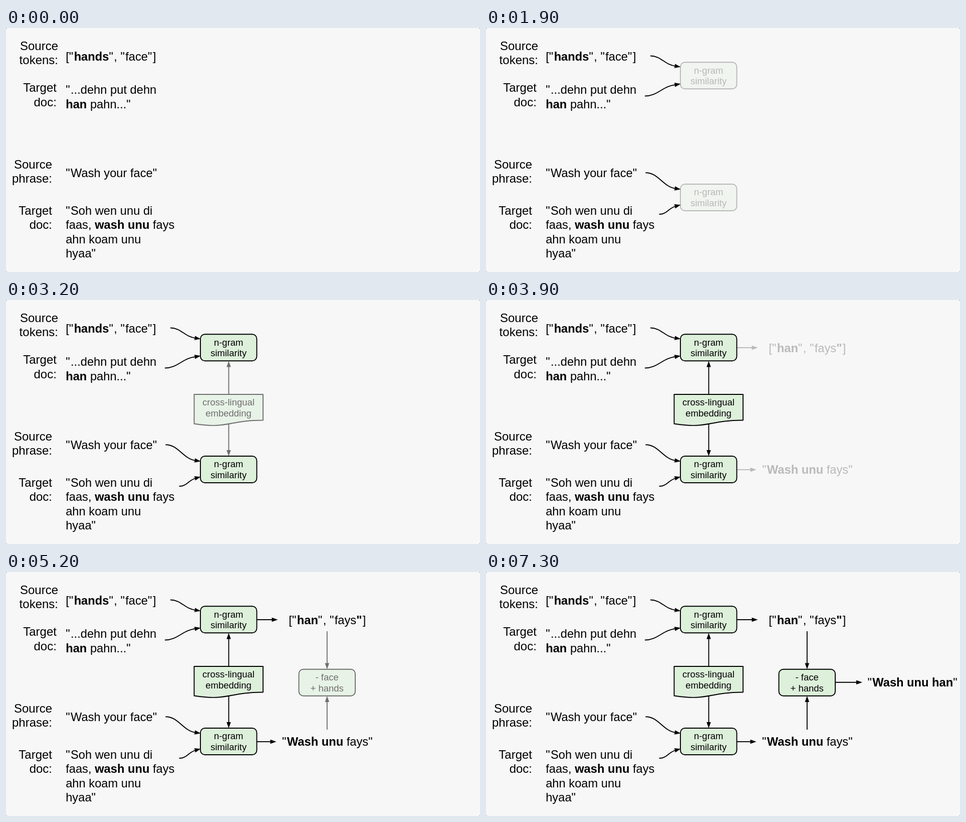
Animation, 946 px wide and 486 px high, one loop 7400 ms. Source, as an HTML page:

```html
<!DOCTYPE html>
<html lang="en">
<head>
<meta charset="utf-8">
<title>Phrase matching diagram</title>
<style>
  html, body { margin: 0; width: 100%; height: 100%; overflow: hidden; background: #666; }
  svg { display: block; width: 946px; height: 486px; }
  text { font-family: "Liberation Sans", Arial, sans-serif; font-size: 23.7px; fill: #000; white-space: pre; }
  .small { font-size: 18.5px; text-anchor: middle; }
  .right { font-size: 24px; text-anchor: end; }
  .bold { font-weight: bold; }
  .quote { letter-spacing: .06em; }
  .line { fill: none; stroke: #000; stroke-width: 1.9; }
  .shape { fill: #ddf0da; stroke: #000; stroke-width: 1.9; stroke-linejoin: round; }
</style>
</head>
<body>
<svg id="stage" viewBox="0 0 946 486">
  <rect width="946" height="486" rx="2.5" fill="#f7f7f7"/>
</svg>
<script>
const LOOP = 7400, STEP = 100, FIRST = 650, FADE = 1000;
const stage = document.getElementById('stage');

function add(parent, tag, attrs, content) {
  const el = document.createElementNS('http://www.w3.org/2000/svg', tag);
  for (const key in attrs) el.setAttribute(key, attrs[key]);
  if (content) el.textContent = content;
  parent.appendChild(el);
  return el;
}

// Parts between asterisks are bold; quote marks are set a little wider.
function text(parent, x, y, content, cls = '') {
  const el = add(parent, 'text', { x, y, class: cls });
  content.split('*').forEach((part, i) => {
    for (const run of part.split(/(")/).filter(Boolean)) {
      const names = [i % 2 ? 'bold' : '', run === '"' ? 'quote' : ''];
      add(el, 'tspan', { class: names.join(' ').trim() }, run);
    }
  });
}

function lines(parent, x, y, gap, rows, cls) {
  rows.forEach((row, i) => text(parent, x, y + i * gap, row, cls));
}

const label = (x, y, rows) => lines(stage, x, y, 28.5, rows, 'right');
const phrase = (y, rows) => lines(stage, 119.2, y, 28.5, rows);

function head(parent, x, y, angle) {
  add(parent, 'path', { d: 'M0 0L-12 -4.3V4.3Z', transform: `translate(${x} ${y}) rotate(${angle})` });
}

function arrow(parent, d, x, y, angle) {
  add(parent, 'path', { d, class: 'line' });
  head(parent, x, y, angle);
}

function straight(parent, x1, y1, x2, y2) {
  const dx = Math.sign(x2 - x1), dy = Math.sign(y2 - y1);
  arrow(parent, `M${x1} ${y1}L${x2 - 8 * dx} ${y2 - 8 * dy}`, x2, y2, Math.atan2(dy, dx) * 180 / Math.PI);
}

function box(parent, x, y, rows) {
  add(parent, 'rect', { x, y, width: 112.5, height: 53, rx: 9, class: 'shape' });
  lines(parent, x + 56.2, y + 22.3, 21.5, rows, 'small');
}

label(104, 43.5, ['Source', 'tokens:']);
label(100.9, 127.2, ['Target', 'doc:']);
label(92, 279.5, ['Source', 'phrase:']);
label(92, 371.5, ['Target', 'doc:']);
phrase(64.7, ['["*hands*", "face"]']);
phrase(131.3, ['"...dehn put dehn', '*han* pahn..."']);
phrase(297.3, ['"Wash your face"']);
phrase(371.6, ['"Soh wen unu di', 'faas, *wash unu* fays', 'ahn koam unu', 'hyaa"']);

// Each group fades in after the one before it.
const [inputs, match, embed, found, swap, result] =
  Array.from({ length: 6 }, () => add(stage, 'g', {}));
const groups = [inputs, match, embed, found, swap, result];

arrow(inputs, 'M328 55.5C350 55.5 356 73.5 379 76', 388.5, 77.5, 9);
arrow(inputs, 'M317 135.5C343 135.5 353 115 379 113', 388.5, 111.3, -9);
arrow(inputs, 'M318.5 288.3C345 288.3 353 317 379 319.7', 388.5, 321.3, 9);
arrow(inputs, 'M345.5 371C362 371 364 358 380 354.6', 388.5, 352.3, -14);

box(match, 388, 68.3, ['n-gram', 'similarity']);
box(match, 388, 311, ['n-gram', 'similarity']);

straight(embed, 444.5, 188.5, 444.5, 121.5);
straight(embed, 444.5, 247, 444.5, 311);
add(embed, 'path', { d: 'M375.5 188H513V239.5C444 239.5 444 257 375.5 246.5Z', class: 'shape' });
lines(embed, 444, 210, 21.5, ['cross-lingual', 'embedding'], 'small');

straight(found, 501, 95, 542.5, 95);
straight(found, 501, 338, 539.5, 338);
text(found, 564.3, 103.5, '["*han*", "fays*"*]');
text(found, 551, 346.3, '"*Wash unu* fays"');

straight(swap, 640.8, 118, 640.8, 193.5);
straight(swap, 640.8, 314, 640.8, 247);
box(swap, 584.5, 193.8, ['- face', '+ hands']);

straight(result, 697.5, 219.7, 751, 219.7);
text(result, 761.4, 228, '"*Wash unu han*"');

function draw(now) {
  const t = Math.floor(now % LOOP / STEP) * STEP;
  groups.forEach((group, i) => {
    const shown = (t - FIRST - i * FADE) / FADE;
    group.setAttribute('opacity', Math.max(0, Math.min(1, shown)));
  });
}

let start;
function tick(now) {
  start ??= now;
  draw(now - start);
  requestAnimationFrame(tick);
}
draw(0);
requestAnimationFrame(tick);
</script>
</body>
</html>
```
